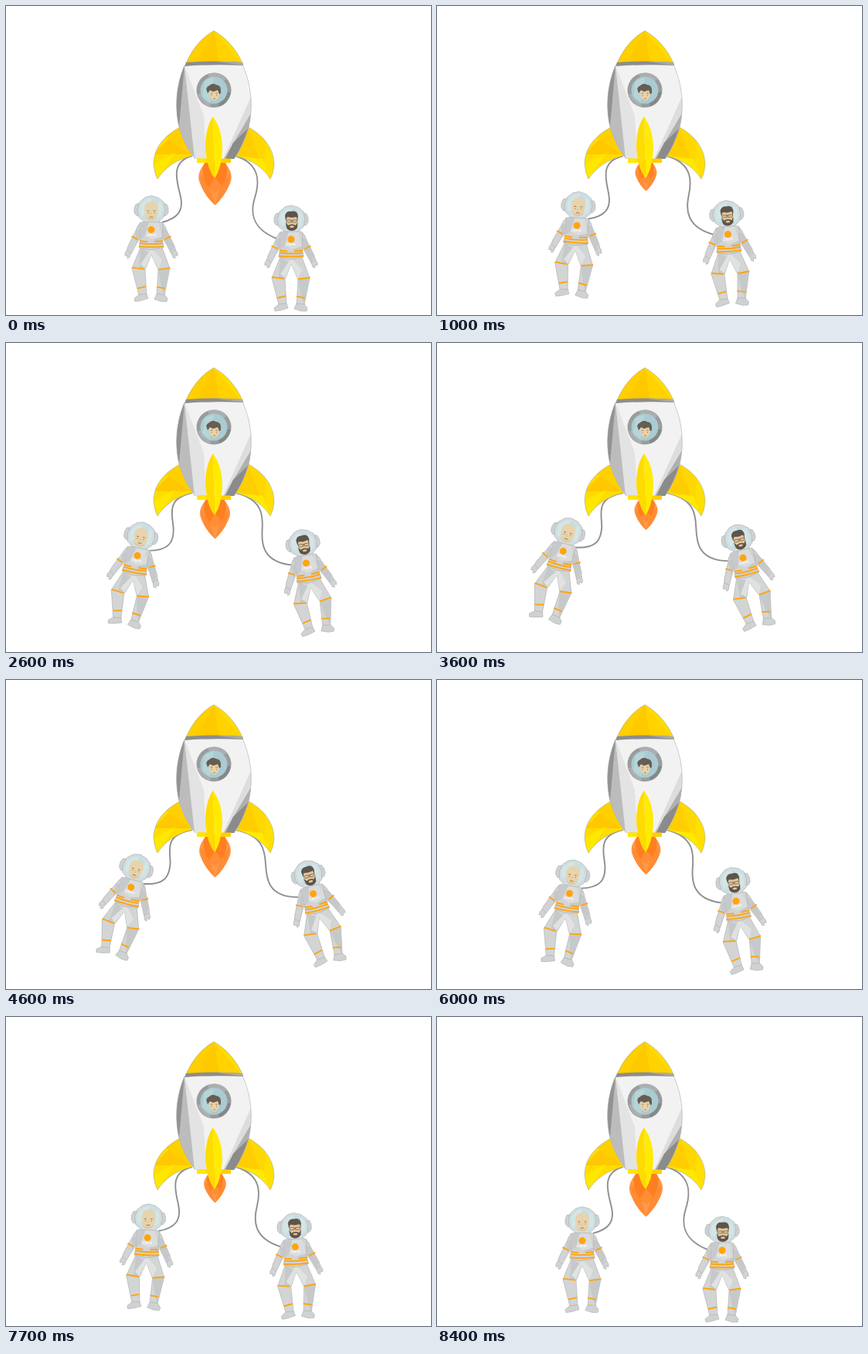
Animation, 550 px wide and 400 px high, one loop 8.6 s. Source, as an HTML page:

```html
<!DOCTYPE html>
<html lang="en">
<head>
<meta charset="utf-8">
<title>Rocket and crew</title>
<style>
  html, body { margin: 0; width: 100%; height: 100%; overflow: hidden; background: #fff; }
  svg { display: block; width: 550px; height: 400px; }
  .cord { fill: none; stroke: #8f8f8f; stroke-width: 1.9; }
  .edge { stroke: #a9adae; stroke-width: .6; stroke-linejoin: round; }
  .band { fill: none; stroke: #ffa40d; stroke-width: 1.9; }
  .badge { font: 700 4.4px Lato, sans-serif; fill: #fff; text-anchor: middle; }
  .line { fill: none; stroke: #6d5c4c; stroke-width: .7; stroke-linecap: round; }
</style>
</head>
<body>
<svg viewBox="0 0 550 400">
  <defs>
    <clipPath id="hull"><path d="M231 77C222 98 217 126 224 157Q231 181 245 198H295Q307 181 314 157C321 126 316 98 306 76Z"/></clipPath>
    <clipPath id="nose"><path d="M269 32C253 41 241 56 233 74Q270 71 306 74C298 56 285 41 269 32Z"/></clipPath>
    <clipPath id="finL"><path d="M225 157C205 168 191 183 191 205Q192 216 196 224C206 209 220 199 241 194L250 190 240 157Z"/></clipPath>
    <clipPath id="finR"><path d="M314 157C334 168 347 185 347 206Q346 217 342 224C333 209 318 199 297 194L290 190 300 157Z"/></clipPath>

    <g id="suit">
      <!-- arms -->
      <g class="edge" fill="#d2d3d4">
        <path d="M-14 18Q-18 21 -20 28L-30 48-32 55-26 58-19 45-11 32Z"/>
        <path d="M14 18Q18 21 20 28L30 48 32 55 26 58 19 45 11 32Z"/>
        <path d="M-31 53L-34 57-34 61-31 60-31 64-28 63-26 57Z"/>
        <path d="M31 53L34 57 34 61 31 60 31 64 28 63 26 57Z"/>
      </g>
      <path fill="#c6c8c9" d="M-20 28L-11 24-12 34-19 45ZM20 28L12 24 12 34 26 57 30 48Z"/>
      <!-- legs -->
      <path class="edge" fill="#d3d5d5" d="M-14 50H14L24 77 17 112H7L9 79 0 59-8 79-6 112H-16L-25 77Z"/>
      <path fill="#c6c9c9" d="M-14 50L0 59-8 78-16 77ZM9 79L24 77 17 112 13 100Z"/>
      <path fill="#e0e1e1" d="M0 51L-14 72-8 77 0 59 9 78 14 66Z"/>
      <path class="edge" fill="#d0d2d2" d="M-16 111L-6 110-4 116-14 119-21 120-22 116ZM17 111L7 110 4 117 13 120 20 120 21 116Z"/>
      <!-- torso -->
      <path class="edge" fill="#d2d3d4" d="M-15 18L-8 16H9L15 18 14 36 16 50-1 53-16 50-14 36Z"/>
      <path fill="#c7c9ca" d="M-15 18L-3 17-8 35-14 40ZM14 36L1 40 14 44Z"/>
      <path fill="#dbdcdc" d="M-3 17L9 17 14 36 1 40-8 35Z"/>
      <path class="band" d="M-15 41.500L-5 42.500M4 42.500L15 41.500M-15 44.500Q0 46.500 15 44.500M-16 48.500Q0 50.500 16 48.500"/>
      <path class="band" d="M-25.500 35.500L-17.500 39.500M17.500 39.500L25.500 35.500M-25 76L-9 78M9 78.500L24.500 76.500M-18 103L-7 100.500M7 101L18 103"/>
      <circle cy="27" r="4.500" fill="#ffa40d"/>
      <text class="badge" y="35">CREW</text>
      <!-- helmet -->
      <g class="edge">
        <path fill="#cdd3d5" d="M-16-7L-20-6-22-1-22 5-19 9-15 9ZM16-7L20-6 22-1 22 5 19 9 15 9Z"/>
        <path fill="#d3dcdf" d="M-8-15L0-17 9-14.500 16-9 18 1 16 11 9 17-8 17-16 11-18 1-15-9Z"/>
      </g>
      <path fill="#c5dfe4" d="M-7-12L1-14 9-11 14-5 14 7 9 13-8 13-14 7-14-4Z"/>
      <path fill="#d2e6e8" d="M-7-12L1-14-10 10-14 7-14-4ZM9-11L14-5 14 7 8 13Z"/>
    </g>
  </defs>

  <path class="cord" id="cordL"/>
  <path class="cord" id="cordR"/>

  <g id="flame">
    <path fill="#ff9847" d="M-12-2C-22 9-24 19-18 29Q-12 43 0 54Q12 43 18 29C24 19 22 9 12-2Z"/>
    <path fill="#ff8c35" d="M-20 13L-8 26 0 54Q-12 43-18 29ZM20 13L8 25 0 54Q12 43 18 29Z"/>
    <path fill="#ff7f20" d="M-13-2C-18 8-16 19-8 31L0 38 9 29C16 18 18 8 13-2Z"/>
    <path fill="#ff8e35" d="M0 18L-8 31 0 38 9 29Z"/>
  </g>

  <!-- side fins -->
  <g clip-path="url(#finL)">
    <path fill="#ffdc00" d="M185 150H250V230H185Z"/>
    <path fill="#ffc800" d="M225 157L191 192 250 192 240 157Z"/>
    <path fill="#ffd000" d="M225 157L205 168 241 194Z"/>
    <path fill="#ffe800" d="M191 205L219 190 196 224Z"/>
  </g>
  <g clip-path="url(#finR)">
    <path fill="#ffdf00" d="M290 150H350V230H290Z"/>
    <path fill="#ffce00" d="M314 157L300 157 290 190 330 202Z"/>
    <path fill="#ffd700" d="M314 157L336 172 334 211Z"/>
    <path fill="#ffe900" d="M297 194L332 198 342 224Z"/>
  </g>
  <g class="edge" fill="none">
    <path d="M225 157C205 168 191 183 191 205Q192 216 196 224C206 209 220 199 241 194"/>
    <path d="M314 157C334 168 347 185 347 206Q346 217 342 224C333 209 318 199 297 194"/>
  </g>

  <!-- hull -->
  <g clip-path="url(#hull)">
    <path fill="#f2f2f2" d="M215 70H325V200H215Z"/>
    <path fill="#bcbcbc" d="M231 77L215 70V200H245Z"/>
    <path fill="#929292" d="M231 77L215 90V155H224Z"/>
    <path fill="#e3e3e3" d="M231 77L244 198H259L256 142Z"/>
    <path fill="#dddddd" d="M322 106L281 198H300L320 160Z"/>
    <path fill="#b0b0b0" d="M320 134L282 198H298L318 160Z"/>
    <path fill="#8b8b8b" d="M315 157L294 177 284 198H298Z"/>
  </g>
  <path class="edge" fill="none" d="M231 77C222 98 217 126 224 157Q231 181 245 198M295 198Q307 181 314 157C321 126 316 98 306 76"/>

  <!-- nose -->
  <g clip-path="url(#nose)">
    <path fill="#ffd200" d="M230 30H310V76H230Z"/>
    <path fill="#ffcf00" d="M269 32L230 50V76H246Z"/>
    <path fill="#ffc900" d="M269 32L246 76H276Z"/>
    <path fill="#ffdc00" d="M269 32L310 60 306 76Z"/>
  </g>
  <path class="edge" fill="none" d="M233 74C241 56 253 41 269 32C285 41 298 56 306 74"/>
  <path fill="#8d8d8d" d="M233 73Q270 70 306 73L307 77Q270 75 231 78Z"/>
  <path fill="#aaaaaa" d="M270 71.500L306 73 307 77Z"/>

  <!-- porthole -->
  <circle cx="269" cy="109" r="22.500" fill="#999c9d"/>
  <path fill="#acaeaf" d="M261 88Q277 83 286 94L269 109ZM248 114Q252 127 264 131L269 109Z"/>
  <path fill="#858889" d="M291 112Q287 126 276 130L269 109Z"/>
  <circle cx="269" cy="109" r="17.500" fill="#a9cbd1"/>
  <path fill="#b7d4d8" d="M257 97L269 92 264 125 254 117Z"/>
  <path fill="#ead2a8" d="M263 108H276L275.500 117Q269.500 128 263.500 117Z"/>
  <path fill="#665d53" d="M261 113Q257 105 263 103Q267 99 272 102Q279 102 278 113L276 114 274 109 268 111 264 109Z"/>
  <path class="line" d="M265 113H267M271.500 113H273.500M266 115.500V116M272.500 115.500V116M268.500 120H270.500"/>

  <!-- base and middle fin -->
  <path fill="#ffcf00" d="M247 197.500H291V203H247Z"/>
  <path fill="#ffe600" d="M247 197.500H258L261 203H247Z"/>
  <path fill="#ffdb00" d="M268 143Q258 157 258 183Q260 211 270 223Z"/>
  <path fill="#ffea00" d="M268 143Q280 160 280 184Q279 210 270 223Z"/>

  <g id="crewL">
    <use href="#suit"/>
    <path fill="#e8d3ac" d="M-9 1Q-9-9 0-9Q9-9 9 1L8 9Q5 15 0 15Q-6 15-8 9Z"/>
    <path fill="#e0c79c" d="M0 3L-2 8H1ZM-7 11Q0 14 7 11Q4 15 0 15Q-5 15-7 11Z"/>
    <path class="line" d="M-5 2.500H-3M3 2.500H5M-4 5V5.500M4 5V5.500M-2 10.500Q0 11 2 10.500"/>
  </g>

  <g id="crewR">
    <use href="#suit"/>
    <path fill="#e3c69d" d="M-7-4H9L8 9Q1 16-6 9Z"/>
    <path fill="#5f5449" d="M-7 3L-8-4Q-6-10 0-9Q8-11 9-3L8 3 7-2 1-1-5-2Z"/>
    <path fill="#5f5449" d="M-7 5L-4 9Q1 6 6 9L8.500 5 8 12Q5 16 1 16Q-4 16-6 12Z"/>
    <path fill="#e3c69d" d="M-2 10Q1 8.500 4 10L3 12H-1Z"/>
    <path class="line" d="M-6 2H0V5H-5ZM2 2H8L7 5H2ZM0 3H2"/>
  </g>
</svg>

<script>
  const LOOP = 8600, STEP = 100, TURN = 42;
  const el = id => document.getElementById(id);

  // Each member drifts from its start by (dx, dy) while turning; u runs 0 to 1.
  const crew = [
    { node: el('crewL'), x: 188, y: 262.6, dx: -21, dy: -22.5, turn: 17 },
    { node: el('crewR'), x: 369, y: 275, dx: 24, dy: -27, turn: -16 }
  ];

  // Points: start, two controls, joint, control, end.
  const cords = [
    { node: el('cordL'),
      near: [241, 194, 211, 202, 222, 229, 226, 247, 222, 275, 202, 280],
      far: [241, 194, 201, 201, 213, 222, 211, 238, 203, 265, 174, 262] },
    { node: el('cordR'),
      near: [297, 194, 332, 205, 327, 232, 322, 248, 315, 287, 350, 301],
      far: [297, 194, 334, 201, 336, 221, 337.5, 238, 341, 281, 381, 279] }
  ];

  function render(ms) {
    const step = Math.min(Math.floor(ms % LOOP / STEP), 2 * TURN);
    const u = 1 - Math.abs(step - TURN) / TURN;

    for (const c of crew) {
      c.node.setAttribute('transform',
        `translate(${c.x + c.dx * u} ${c.y + c.dy * u}) rotate(${c.turn * u})`);
    }
    for (const { node, near, far } of cords) {
      const p = near.map((v, i) => v + (far[i] - v) * u);
      node.setAttribute('d', `M${p.slice(0, 2)}C${p.slice(2, 8)}S${p.slice(8)}`);
    }

    const phase = 2 * Math.PI * (step * STEP - 8494) / 2083;
    const size = 0.82 + 0.198 * Math.cos(phase);
    el('flame').setAttribute('transform', `translate(270.5 204) scale(${size})`);
  }

  let start;
  function tick(now) {
    start ??= now;
    render(now - start);
    requestAnimationFrame(tick);
  }
  render(0);
  requestAnimationFrame(tick);
</script>
</body>
</html>
```
